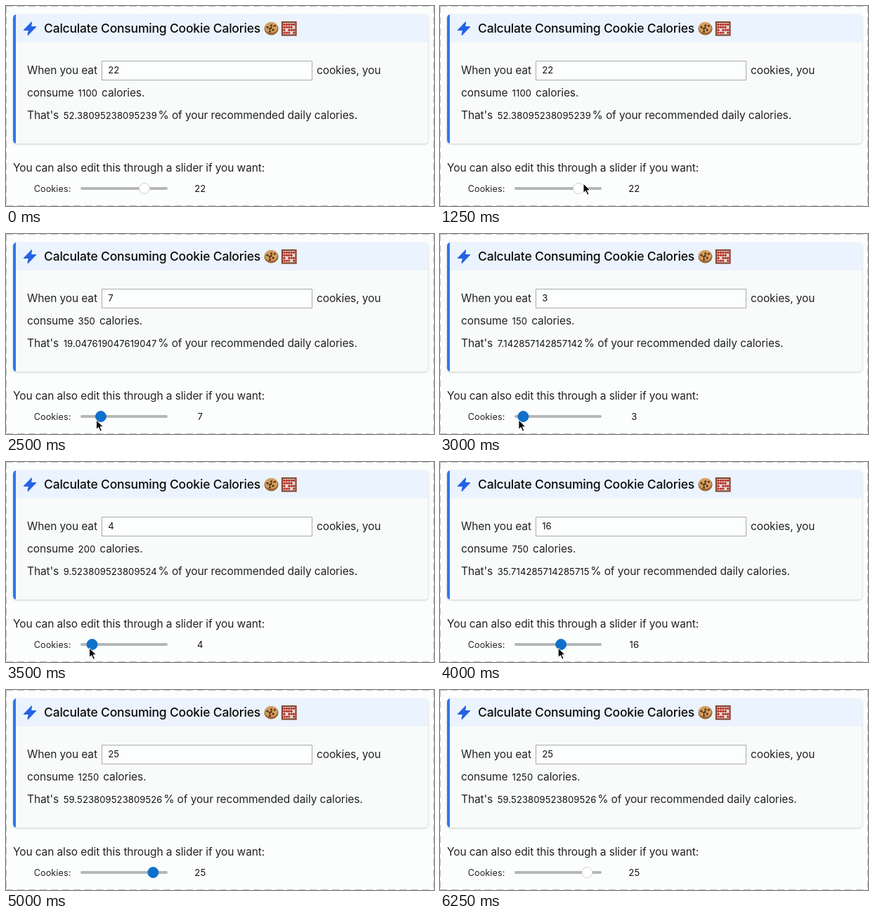
These frames come from a looping animation (609x285 px, 6.5 s). An HTML page:

```html
<!DOCTYPE html>
<html lang="en">
<head>
<meta charset="utf-8">
<title>Cookie calories</title>
<style>
  html, body { margin: 0; width: 100%; height: 100%; overflow: hidden; background: #fcfefd; }
  svg { display: block; width: 100vw; height: 100vh; }
  text { font: 15.5px Inter, sans-serif; letter-spacing: -.11px; fill: #222; white-space: pre; }
  .title { font-size: 17.5px; font-weight: 500; letter-spacing: -.19px; fill: #0c0c0c; }
  .num { font-size: 13px; letter-spacing: .12px; fill: #111; }
  .label { font-size: 12.6px; letter-spacing: .1px; }
  .card { filter: drop-shadow(0 1px 1.5px rgba(0, 0, 0, .2)); }
  .dash { fill: none; stroke: #bdbfbe; stroke-dasharray: 10 6; }
</style>
</head>
<body>
<svg viewBox="0 0 609 285">
  <defs>
    <clipPath id="round"><rect x="10" y="12" width="590.500" height="184" rx="5"/></clipPath>
  </defs>
  <rect width="609" height="285" fill="#fcfefd"/>
  <path class="dash" d="M0 .5H609M0 284.500H609M.5 0V285M608.500 0V285"/>

  <g class="card">
    <g clip-path="url(#round)">
      <rect x="10" y="12" width="591" height="184" fill="#f9fbfb"/>
      <rect x="10" y="12" width="591" height="40" fill="#ebf3fe"/>
      <rect x="10" y="12" width="4" height="184" fill="#2e78ee"/>
    </g>
  </g>
  <path d="M36.500 23L25.500 34.500H32.500L31 41.500L42.500 29.500H35.500Z" fill="#2563e4" stroke="#2563e4" stroke-width="1.200" stroke-linejoin="round"/>
  <text class="title" x="54" y="38">Calculate Consuming Cookie Calories</text>

  <g id="cookie">
    <ellipse cx="377.500" cy="32.300" rx="10" ry="9.200" fill="#9a6230"/>
    <ellipse cx="377.300" cy="30.800" rx="9" ry="7.700" fill="#d3a061"/>
  </g>
  <g id="abacus">
    <rect x="393" y="23" width="19.500" height="18.500" fill="#eadfd9" stroke="#83452f" stroke-width="2.200"/>
  </g>

  <text x="30" y="97">When you eat</text>
  <rect x="136.500" y="78.500" width="299" height="27" fill="#fdfefe" stroke="#aaacac"/>
  <text class="num" id="field" x="145.200" y="96"></text>
  <text x="442" y="97">cookies, you</text>
  <text x="30" y="129">consume</text>
  <text x="102.600" y="129"><tspan class="num" id="calories"></tspan><tspan dx="6">calories.</tspan></text>
  <text x="30" y="161">That's</text>
  <text x="81.700" y="161"><tspan class="num" id="percent"></tspan><tspan dx="1.700">% of your recommended daily calories.</tspan></text>

  <text x="10" y="236">You can also edit this through a slider if you want:</text>
  <text class="label" x="39.700" y="265">Cookies:</text>
  <rect x="106" y="258" width="124" height="4" rx="2" fill="#b5b6b6"/>
  <circle id="thumb" cy="260" r="7.500"/>
  <text class="num" id="amount" x="276.300" y="265" text-anchor="middle"></text>

  <path id="cursor" d="M1 1V14.500L4.200 11.600L6.700 17.200L9 16.200L6.600 10.800H11Z" fill="#0b0b0b" stroke="#fff" stroke-width="1" stroke-linejoin="round"/>
</svg>
<script>
const LOOP = 6500;
const TICK = 250;
const KCAL = 50, DAILY = 2100;

// slider drag: time, cookies
const DRAG = [[1975, 22], [2000, 21], [2500, 6.8], [3000, 3], [3250, 3], [3500, 4], [4000, 15.8], [4500, 24.3], [4750, 25]];
// pointer on its way to the slider, one point per tick
const APPROACH = [[503, 109], [372, 151], [353, 158], [255, 188], [203, 252], [190, 259]];
const HOVER = 1500, TURN = 3250, HIDE = 5000, RELEASE = 6250;

const el = id => document.getElementById(id);
const thumbX = cookies => 106 + 124 * cookies / 30;

function cookiesAt(time) {
  const next = DRAG.findIndex(([t]) => t >= time);
  if (next < 0) return DRAG.at(-1)[1];
  if (next === 0) return DRAG[0][1];
  const [[t0, v0], [t1, v1]] = DRAG.slice(next - 1, next + 1);
  return Math.round(v0 + (v1 - v0) * (time - t0) / (t1 - t0));
}

function pointerAt(time) {
  if (time < TICK || time >= HIDE) return null;
  const point = APPROACH[time / TICK - 1];
  if (point) return point;
  const grip = time < TURN ? 7.5 : 5;
  return [Math.min(thumbX(cookiesAt(time)) - grip, 201), 264];
}

function show(time) {
  const cookies = cookiesAt(time);
  // calories and percent trail the slider slightly
  el("field").textContent = el("amount").textContent = cookies;
  el("calories").textContent = cookiesAt(time - 20) * KCAL;
  el("percent").textContent = cookiesAt(time - 30) * KCAL / DAILY * 100;

  const lit = time >= HOVER && time < RELEASE;
  el("thumb").setAttribute("cx", thumbX(cookies));
  el("thumb").setAttribute("fill", lit ? "#1070ca" : "#fff");
  el("thumb").setAttribute("stroke", lit ? "#1070ca" : "#cfd0d0");

  const pointer = pointerAt(time);
  el("cursor").style.display = pointer ? "" : "none";
  if (pointer) el("cursor").setAttribute("transform", `translate(${pointer})`);
}

function dot(parent, cx, cy, r, fill) {
  const c = document.createElementNS("http://www.w3.org/2000/svg", "circle");
  for (const [key, value] of Object.entries({ cx, cy, r, fill })) c.setAttribute(key, value);
  parent.append(c);
}

function drawIcons() {
  for (let i = 0; i < 7; i++) {
    const angle = i * 2.4, r = 2.7 * Math.sqrt(i);
    dot(el("cookie"), 377.3 + r * Math.cos(angle), 31 + r * Math.sin(angle) * .85, 1.6, "#5d3519");
  }
  for (let i = 0; i < 20; i++) {
    const row = Math.floor(i / 5), col = i % 5;
    if (row && col === (row * 2 + 2) % 5) continue;
    dot(el("abacus"), 396 + col * 3.4, 26.4 + row * 3.9, 1.7, "#b8332d");
  }
}

const start = performance.now();
let shown;

function frame() {
  const elapsed = (performance.now() - start) % LOOP;
  const time = elapsed - elapsed % TICK;
  if (time !== shown) show(shown = time);
  requestAnimationFrame(frame);
}

drawIcons();
frame();
</script>
</body>
</html>
```
